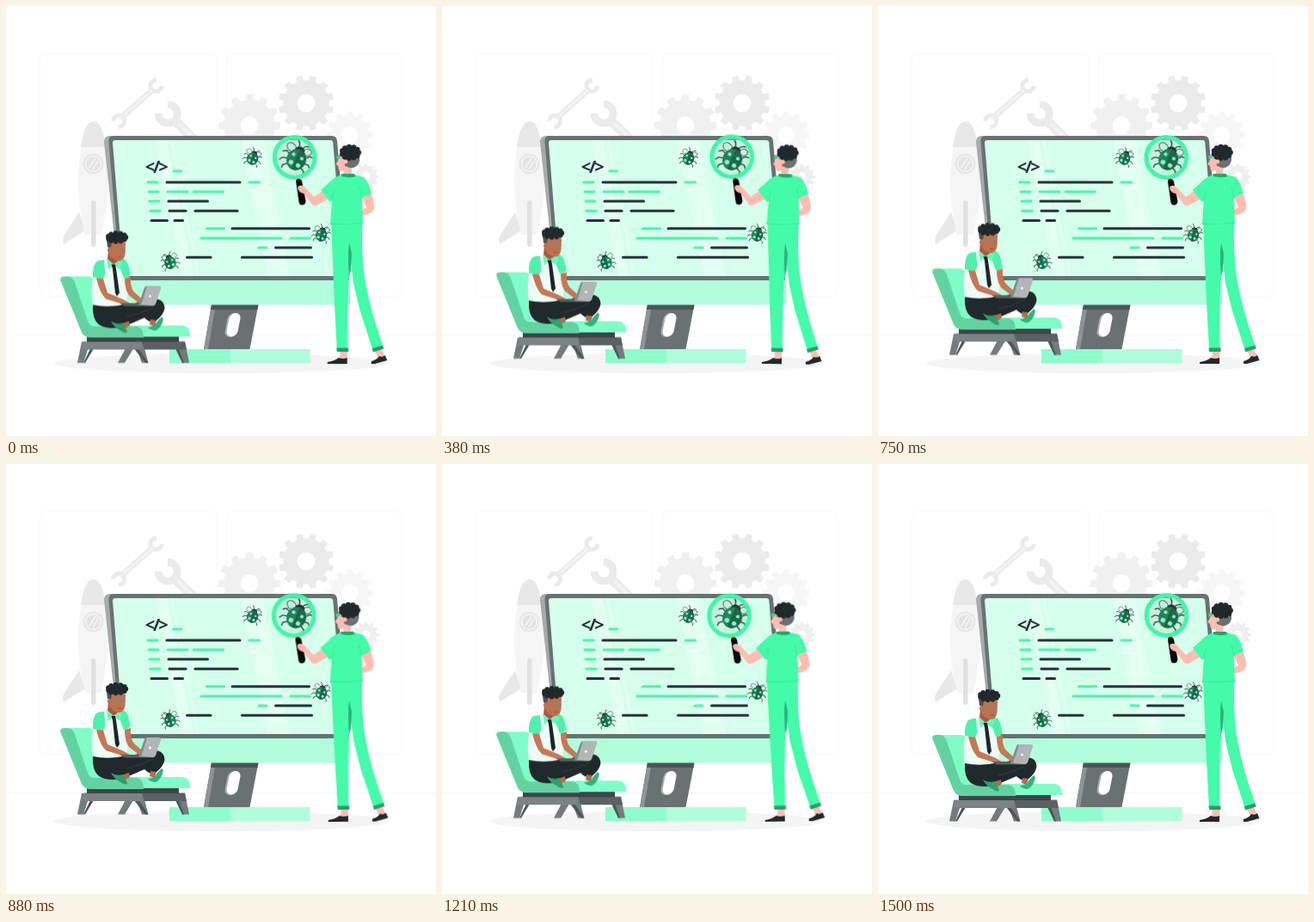
These frames come from a looping animation (500x500 px, 1.54 s). An HTML page:

```html
<!DOCTYPE html>
<html lang="en">
<head>
<meta charset="utf-8">
<title>Bug hunt</title>
<style>
  html, body { margin: 0; width: 100%; height: 100%; overflow: hidden; background: #fff; }
  svg { display: block; width: 100%; height: 100%; }
  .float { animation: float 1540ms linear -40ms infinite; }
  .sway { transform-origin: 376px 283.5px; animation: sway 1540ms linear -40ms infinite; }
  @keyframes float { 50% { transform: translateY(-10px); } }
  @keyframes sway {
    0%, 100% { transform: rotate(0deg); }
    25% { transform: rotate(1deg); }
    75% { transform: rotate(-1deg); }
  }
  .line { fill: none; stroke-linecap: round; stroke-linejoin: round; }
  .code { font: bold 20px "Open Sans", "Noto Sans", sans-serif; letter-spacing: -2px; fill: #263238; }
</style>
</head>
<body>
<svg viewBox="0 0 500 500">
  <defs>
    <g id="bug">
      <g class="line" stroke="#263238" stroke-width="1.1">
        <path d="M-8 -3L-13 -5L-16 -3M-9 2L-14 3L-16 6M-7 7L-11 10L-11 13"/>
        <path d="M8 -4L12 -8L15 -8M9 1L14 1L16 4M7 6L12 9L12 12"/>
        <path d="M-2 -13Q-2 -17 -5 -19M2 -13Q4 -17 8 -17"/>
        <g stroke-width=".7">
          <ellipse cx="-9" cy="-10" rx="5.5" ry="4" transform="rotate(25 -9 -10)"/>
          <ellipse cx="8" cy="-11" rx="4.5" ry="3.5" transform="rotate(-30 8 -11)"/>
        </g>
      </g>
      <path d="M-5.5 -8Q-5 -14 0 -14Q5 -14 5.500 -8Z" fill="#263238"/>
      <ellipse rx="10" ry="11" fill="#24805a"/>
      <path d="M0 -11A10 11 0 0 1 0 11Z" fill="#1c6a4a"/>
      <path d="M0 -10V11" stroke="#174f3a" stroke-width=".8"/>
      <g fill="#8df3c6">
        <circle cx="-4.500" cy="-4" r="1.900"/><circle cx="-4" cy="4.500" r="2.400"/>
        <circle cx="5" cy="-3" r="1.800"/><circle cx="4" cy="5" r="2.300"/>
      </g>
    </g>
    <path id="jaw" d="M.7 -.7A1 1 0 1 0 .7 .7" fill="none"/>
  </defs>

  <!-- backdrop -->
  <g fill="none" stroke="#fafafa">
    <rect x="39.5" y="55.5" width="205" height="282" rx="5.5"/>
    <rect x="256.5" y="55.5" width="203.5" height="282" rx="5.5"/>
    <path d="M0 382.5H500" stroke="#f6f6f6"/>
  </g>
  <g id="gears"></g>
  <g stroke="#ebebeb">
    <path d="M135 129L171 97" stroke-width="7"/>
    <use href="#jaw" transform="translate(174.5 92.7) rotate(-42) scale(6.6)" stroke-width=".76"/>
    <use href="#jaw" transform="translate(131 134) rotate(138) scale(6.6)" stroke-width=".76"/>
    <path d="M137 127L170 98" stroke="#f6f6f6" stroke-width="2"/>
  </g>
  <g stroke="#ebebeb">
    <path d="M194 131L226 162" stroke-width="11"/>
    <use href="#jaw" transform="translate(188 125) rotate(-135) scale(11)" stroke-width=".8"/>
    <path d="M200 136L226 161" stroke="#f3f3f3" stroke-width="4"/>
  </g>
  <g>
    <path d="M85 240L68 266Q65 271 67 277L92 261Z" fill="#e8e8e8"/>
    <path d="M88 163H115Q120 183 119 205Q118 240 110 266H92Q84 235 84 205Q84 180 88 163Z" fill="#f5f5f5"/>
    <path d="M87 164Q91 134 102 134Q112 134 116 164Z" fill="#e8e8e8"/>
    <circle cx="101.5" cy="183.5" r="12" fill="#e8e8e8"/>
    <circle cx="101.5" cy="183.5" r="9.5" fill="#f5f5f5"/>
    <circle cx="101.5" cy="183.5" r="8" fill="#e3e3e3"/>
    <path d="M97 188L104 177M101 190L107 180" stroke="#f3f3f3" stroke-width="2"/>
    <rect x="99" y="226" width="5.5" height="54" rx="2.7" fill="#e1e1e1"/>
  </g>
  <ellipse cx="250" cy="415.5" rx="194" ry="11.5" fill="#f4f4f4"/>

  <!-- monitor -->
  <path d="M190 399H353.500V415.300H190Z" fill="#affddb"/>
  <path d="M190 399H261V415.300H190Z" fill="#8efccd"/>
  <path d="M239 347H293.500L283.500 399H230Z" fill="#697173"/>
  <path d="M239 347H244L235 399H230Z" fill="#8e9496"/>
  <path d="M239 347H293.500L292.500 353H238Z" fill="#4c5456"/>
  <g transform="translate(264 371) skewX(-11)">
    <rect x="-8" y="-14" width="14" height="28" rx="7" fill="#a7adae"/>
    <rect x="-6" y="-14" width="13" height="27.500" rx="6.500" fill="#fff"/>
  </g>
  <path d="M114 158Q114 151 121 151H130L145 347H139Q135 347 134 342Z" fill="#a5aaab"/>
  <path d="M125 151H379Q384.500 151 385 157L399 319H133L119.500 158Q119 151 125 151Z" fill="#687173"/>
  <path d="M133 319H399L400 344Q400 347.500 397 347.500H142Q136 347.500 135.500 342Z" fill="#b1fddc"/>
  <path d="M399.300 319L400 344Q400 347.500 397 347.500" class="line" stroke="#9adfc0" stroke-width=".7"/>
  <path d="M127 156H377Q380 156 380.300 159L393.500 314H136.500L124 159Q124 156 127 156Z" fill="#d6feec"/>
  <g fill="#fff" opacity=".28">
    <path d="M174 156H187L218 314H205ZM191 156H194L225 314H222ZM273 156H299L330 314H304Z"/>
  </g>
  <text class="code" x="161.700" y="194.200">&lt;/&gt;</text>
  <g id="lines" class="line" stroke-width="3"></g>
  <use href="#bug" transform="translate(286.500 177.500) rotate(20) scale(.66)"/>
  <use href="#bug" transform="translate(191 298.500) rotate(-15) scale(-.66 .66)"/>
  <use href="#bug" transform="translate(366.500 266.500) rotate(15) scale(.66)"/>

  <g class="sway">
    <circle cx="335.500" cy="176" r="22" fill="#9edcc3" opacity=".38"/>
    <path d="M320 190L347 160L353 165L326 195Z" fill="#fff" opacity=".25"/>
  </g>
  <use href="#bug" transform="translate(337.500 178.500) rotate(22) scale(1.130)"/>

  <!-- coder on the lounger -->
  <g class="float">
    <path d="M88 391H98L90 415.500H83ZM143 391H153L138 415.500H130ZM149 391H159L165.500 415.500H158ZM197 391H208L213 415.500H205Z" fill="#747b7d"/>
    <path d="M98 399H102L92 415.500H90ZM149 399H154L165.500 415.500H162ZM197 399H201L207 415.500H205Z" fill="#4d5557"/>
    <path d="M90 390.500H158V400H87Z" fill="#7c8385"/>
    <path d="M158 390.500H208L210 400H161Z" fill="#596163"/>
    <path d="M94 385H201V391H94Z" fill="#3c4548"/>
    <path d="M72 315H96Q101 315 103 320L117 372H206Q214 373 214.500 385H98Q94 385 92 381Z" fill="#80fdc7"/>
    <path d="M63.500 320Q62 315 68 315H72Q78 316 80 322L95 367Q97 373 103 373H152Q160 374 160 386H99Q91 386 88 380Z" fill="#62d3a0"/>

    <path d="M101 348Q100 365 108 371Q119 378 138 373L161 363Q168 370 174 367Q183 360 184.500 352Q184 341 172 341L145 347Z" fill="#20292c"/>
    <path d="M140 362Q156 359 171 351" class="line" stroke="#3a454b" stroke-width=".7"/>
    <path d="M134 370L143 367L144 372L138 376Z" fill="#b66a4d"/>
    <path d="M168 365L175 366L173 373L167 371Z" fill="#b66a4d"/>
    <path d="M122 367Q128 371 136 369L141 379Q140 382 135 379Q125 374 122 367Z" fill="#2f9f6e"/>
    <path d="M165 374Q173 374 176 367L181 362Q184 363 182 368Q180 375 174 378Q167 377 165 374Z" fill="#2fb47b"/>

    <path d="M106 298L118 295H133L141 299L143 320L140 347Q120 352 101 348Q98 330 102 312Z" fill="#ecfdf5"/>
    <path d="M104 299Q107 295.500 114 296L115.500 312L113 318L101 316Q100.500 306 104 299Z" fill="#4ff0ab"/>
    <path d="M134 294Q140 295 142 301L145 313Q142 316 137 317L132 304Z" fill="#4ff0ab"/>
    <path d="M117 294L125 301L133 292L136 301L131 306L125 301L119 307Z" fill="#6bf5b9"/>
    <path d="M119 285L134 288L132.500 295L125 301L118 294.500Z" fill="#a65a40"/>
    <path d="M122.500 301H127L128 306L132 334L129 338L127 334L124 306Z" fill="#1b2427"/>
    <path d="M138 317L145 315Q144 327 149 333L159 342L156 347L143 337Q138 330 138 317Z" fill="#c67756"/>
    <path d="M105 317L113 317.500L118 334L137 342L144 346L138 348L116 341Q109 334 105 317Z" fill="#c67756"/>

    <path d="M119 275Q130 270 139 276L138.500 289Q137 297 131 297Q122 296 119 286Z" fill="#c0704f"/>
    <path d="M117 273L124 273L122 281L118 281Z" fill="#4d5152"/>
    <circle cx="120.500" cy="284" r="2.600" fill="#c0704f"/>
    <g class="line" stroke="#5f9a7c" stroke-width=".7">
      <circle cx="129.500" cy="283.500" r="2.600"/><circle cx="136" cy="284" r="2.300"/>
      <path d="M121 282L127 283"/>
    </g>
    <path d="M130 292Q132 293 134 292" class="line" stroke="#8c4a35" stroke-width=".8"/>
    <g id="curls" fill="#20292c"></g>

    <path d="M132 346H157L173 347L171 349.500H138Z" fill="#596163"/>
    <path d="M155 348L162 328Q163 326 165 326H178Q181 326 180 329L174 347Q173 349 171 349Z" fill="#b2b5b6"/>
    <path d="M154 348L161 328Q162 326 164 326L157 349Z" fill="#858b8d"/>
    <circle cx="167.500" cy="338" r="1.500" fill="#f3f5f5"/>
  </g>

  <!-- inspector with the glass -->
  <g class="sway">
    <circle cx="335.500" cy="176" r="23.400" fill="none" stroke="#43f4a9" stroke-width="5"/>
    <path d="M337 204Q337 201 340 201Q343 201 344 204L348.500 227Q348 231 345 231.500Q341 232 340.500 228Z" fill="#050808"/>

    <path d="M389 402H397V410H388ZM429 400L436 398L441 407L433 410Z" fill="#ffbdb2"/>
    <path d="M374 414Q382 413 387 409Q392 411 397 409V416H374Z" fill="#20292c"/>
    <path d="M425 413Q432 411 434 407Q438 409 441 406L443.500 412L429 416H425Z" fill="#20292c"/>

    <path d="M423 215Q429 228 428 236Q426 242 413 244L410 240L419 234L413 221Z" fill="#ffbdb2"/>
    <path d="M372 212L358 222L347 210Q341 207 339 211Q340 217 346 218L356 231Q358 233 361 232L379 222Z" fill="#ffbdb2"/>
    <path d="M340 211L346 213M340 214L345 216" class="line" stroke="#e99286" stroke-width=".7"/>

    <path d="M378 251H414.500Q413 290 417 315Q421 340 429 366L439 397L427 401L412 355L404 322L400 290L397.500 340V401H385L382 345Z" fill="#43fba9"/>
    <path d="M399 275L402 288L401 307L399 315Q397 290 399 275Z" fill="#2bb37b"/>
    <path d="M384.500 397.500H398.500V402H385ZM426 398L438.500 394.500L439.500 398.500L427 402.500Z" fill="#279e6b"/>
    <path d="M390 196Q381 199 376 205L366 214L377 228L379 226L377 254H415L414 223L425 218Q422 205 416 199L405 196Z" fill="#43fba9"/>
    <path d="M377 253Q395 255 415 252" class="line" stroke="#35e098" stroke-width=".7"/>
    <path d="M379 226L381 214M414 223L411 211" class="line" stroke="#35e098" stroke-width=".7"/>

    <path d="M389 173Q385 174 386 179L383.500 184L386 186L387 191Q390 193 393 191V197H401.500V178Z" fill="#ffbdb2"/>
    <path d="M390 195L405 195L406 198.500Q397 200 390 198Z" fill="#27a36e"/>
    <path d="M392 174H411V180Q409 188 401 188.500L394 186Z" fill="#6b7070"/>
    <circle cx="394.500" cy="181" r="2.500" fill="#ffbdb2"/>
    <path d="M384.500 173.500Q383 177 386 178.500L388 174ZM387 176L394 178" fill="#43d99b" stroke="#279e6b" stroke-width=".6"/>
    <g id="mop" fill="#20292c"></g>
  </g>
</svg>
<script>
  const NS = 'http://www.w3.org/2000/svg';
  const $ = id => document.getElementById(id);
  const add = (parent, tag, attrs) => {
    const el = document.createElementNS(NS, tag);
    for (const k in attrs) el.setAttribute(k, attrs[k]);
    parent.append(el);
  };

  function gear(x, y, r, hole, fill, turn = 0) {
    const teeth = 12, step = 2 * Math.PI / teeth, pts = [];
    for (let i = 0; i < teeth; i++) {
      for (const [at, k] of [[-.31, .82], [-.2, 1], [.2, 1], [.31, .82]]) {
        const a = (i + at + turn) * step;
        pts.push((x + k * r * Math.cos(a)).toFixed(2) + ' ' + (y + k * r * Math.sin(a)).toFixed(2));
      }
    }
    const ring = `M${x - hole} ${y}a${hole} ${hole} 0 1 0 ${2 * hole} 0a${hole} ${hole} 0 1 0 ${-2 * hole} 0Z`;
    add($('gears'), 'path', { d: `M${pts.join('L')}Z${ring}`, fill, 'fill-rule': 'evenodd' });
  }
  gear(283, 139, 36.5, 10.5, '#f0f0f0');
  gear(400, 150, 27.5, 10, '#f6f6f6');
  gear(418.5, 198.5, 15, 5, '#efefef');
  gear(349, 113, 32.5, 10.5, '#ebebeb', .5);

  const G = '#43fba9', D = '#263238';
  const rows = [
    [192, G, 195, 203.5],
    [205, G, 165, 176, D, 187, 272, G, 283, 294.5],
    [216, G, 166, 177, G, 188, 211, G, 218, 252.5],
    [227, G, 167, 178, D, 189, 234.5],
    [238.3, G, 168, 179, D, 190, 209, D, 220, 269],
    [249.5, D, 169, 187.5, D, 196, 205.5],
    [258.8, G, 233.5, 253.5, D, 263, 352.5],
    [270, G, 227, 320, G, 331, 353.5],
    [281, G, 294, 303, D, 313.5, 354.5],
    [292.2, D, 210.5, 238, D, 274.5, 355.5]
  ];
  for (const [y, ...bars] of rows)
    for (let i = 0; i < bars.length; i += 3)
      add($('lines'), 'path', { d: `M${bars[i + 1]} ${y}H${bars[i + 2]}`, stroke: bars[i] });

  // curly hair: an oval core with small knots around its rim
  function hair(id, x, y, rx, ry, n, r) {
    add($(id), 'ellipse', { cx: x, cy: y, rx, ry });
    for (let i = 0; i < n; i++) {
      const a = i / n * 2 * Math.PI;
      add($(id), 'circle', { cx: x + rx * Math.cos(a), cy: y + ry * Math.sin(a), r });
    }
  }
  hair('curls', 129, 269.5, 10.3, 4.8, 11, 2.9);
  hair('mop', 400.2, 170.3, 9.6, 6.6, 11, 3.1);
</script>
</body>
</html>
```
